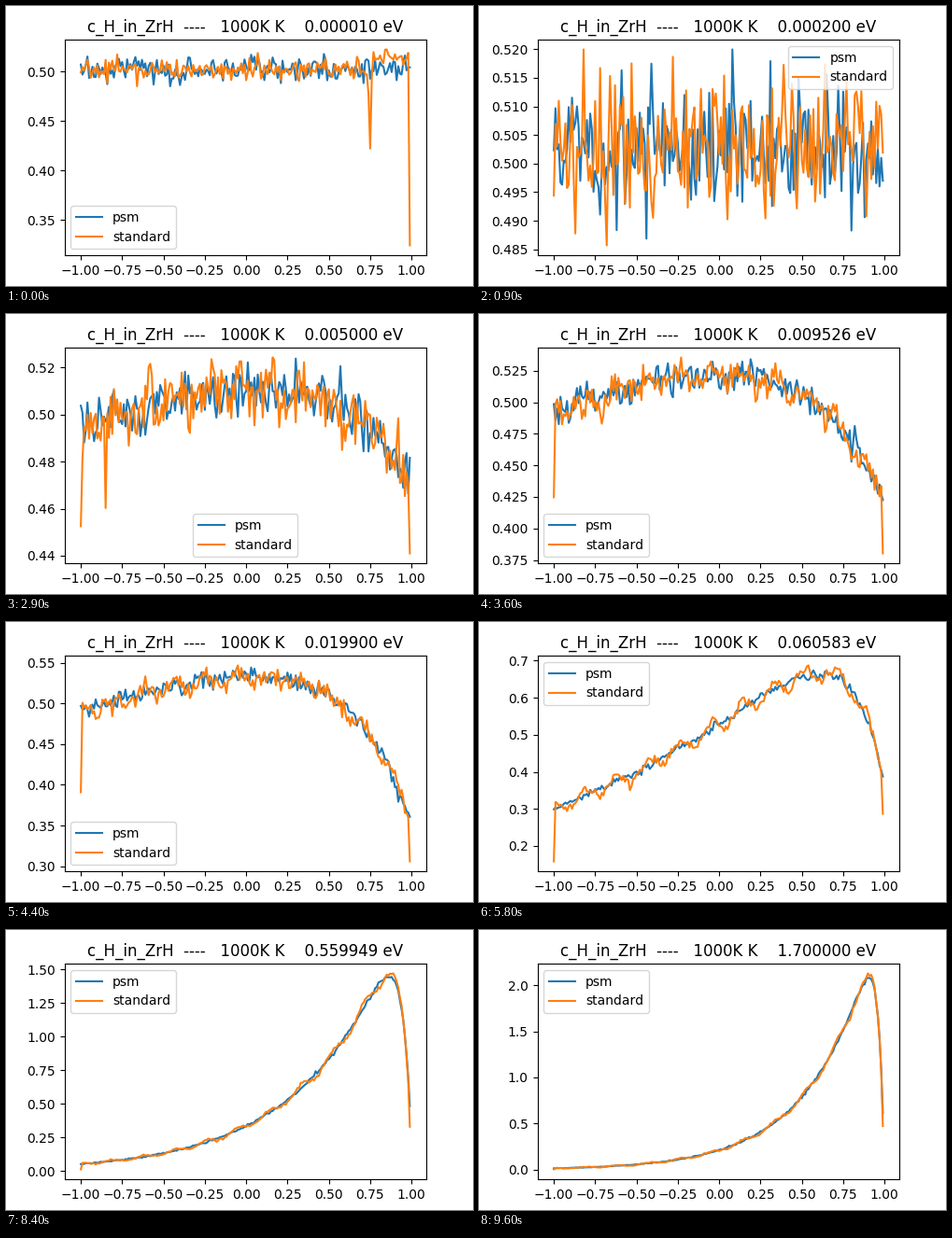
A matplotlib script for the animation above (9700 ms loop, 500 px wide and 300 px high).

```python
import numpy as np
import matplotlib.pyplot as plt
from matplotlib.animation import FuncAnimation

FRAMES = 97
MU = np.arange(200) / 100 - 1
SPREAD = 0.0088   # statistical noise for a density of 1
RIPPLE = 0.032    # largest ripple of the standard curve

# Stages of the sweep, eased linearly in between:
# energy: in eV; tilt: forward slope; loss, rate: fall-off towards mu = 1;
# first, last: drop of the end points; dip, depth, lift: notch and step after it
NAMES = ["frame", "energy", "tilt", "loss", "rate",
         "first", "last", "dip", "depth", "lift"]
STAGES = np.array([
    [0, 1e-5, 0, 0, 1.5, 0, .355, .75, .085, .013],
    [9, 2e-4, 0, 0, 1.5, 0, 0, .75, 0, 0],
    [20, .0015, .025, .05, 1.5, .034, .035, -.87, .034, 0],
    [29, .005, .06, .16, 1.7, .083, .064, -.85, .032, 0],
    [44, .0199, .12, .44, 2.3, .206, .145, -.81, .03, 0],
    [72, .184437, 1.03, .78, 6, .74, .39, -.26, .03, 0],
    [96, 1.7, 2.62, 1, 25, .75, .25, -.1, 0, 0],
])

plt.rcParams["text.kerning_factor"] = 6


def stage(frame):
    """All parameters at one frame; the energy runs on a log scale."""
    marks = STAGES[:, 0]
    p = {name: np.interp(frame, marks, column)
         for name, column in zip(NAMES, STAGES.T)}
    p["energy"] = np.exp(np.interp(frame, marks, np.log(STAGES[:, 1])))
    return p


def density(p):
    """Smooth angular distribution with unit area."""
    f = np.exp(p["tilt"] * MU) * (1 - p["loss"] * np.exp(-p["rate"] * (1 - MU)))
    return f / (f.mean() * (MU[-1] - MU[0]))


def jitter(rng):
    z = rng.normal(size=MU.size)
    return SPREAD * z * 2.8 / np.abs(z).max()


def curves(frame, p):
    rng = np.random.default_rng(500 + frame)
    mean = density(p)
    scale = np.sqrt(mean)
    psm = mean + scale * jitter(rng)

    ripple = RIPPLE * (1 - np.exp(-3 * p["tilt"]))
    wave = ripple * np.cos(2 * np.pi * (MU + .05) / .19)
    notch = p["depth"] * np.exp(-((MU - p["dip"]) / .008) ** 2)
    std = mean + scale * (wave + jitter(rng)) - notch + p["lift"] * (MU > p["dip"])
    if p["first"] > 0:
        std[0] = mean[0] * (1 - p["first"])
    if p["last"] > 0:
        std[-1] = mean[-1] * (1 - p["last"])
    return psm, std


fig, ax = plt.subplots(figsize=(5, 3), dpi=100)


def draw(frame):
    p = stage(frame)
    psm, std = curves(frame, p)
    ax.clear()
    ax.plot(MU, psm, label="psm")
    ax.plot(MU, std, label="standard")
    ax.set_title(f"c_H_in_ZrH  ----   1000K K    {p['energy']:.6f} eV")
    # A flat band without drops leaves no free corner
    flat = max(p["first"], p["last"], p["depth"]) < .01
    ax.legend(loc="upper right" if flat else "best")
    return ax.lines


anim = FuncAnimation(fig, draw, frames=FRAMES, interval=100, repeat=True,
                     repeat_delay=0)
plt.show()
```
